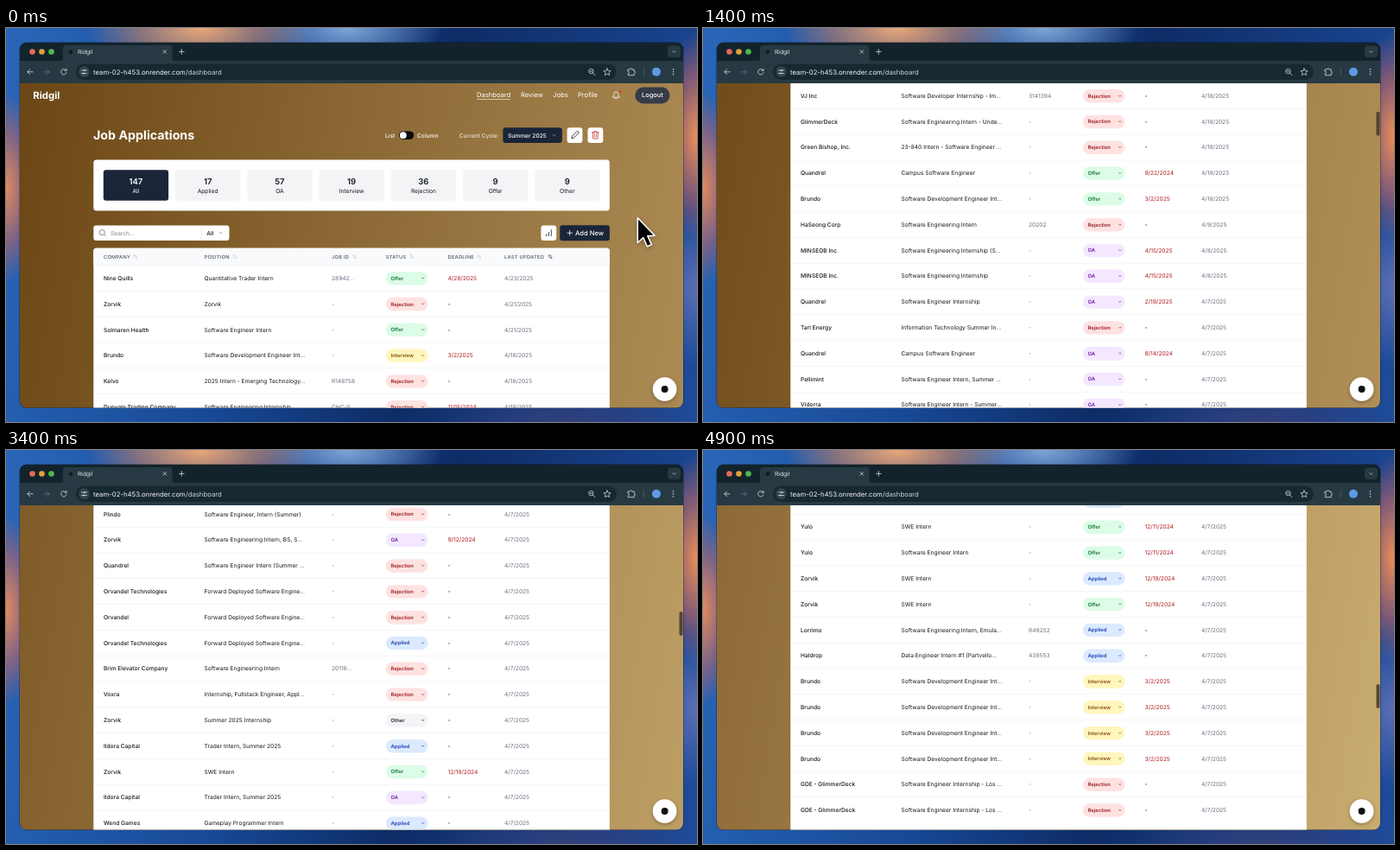
Animation of 800x456 px, one loop 5000 ms. Source, as an HTML page:

```html
<!DOCTYPE html>
<html lang="en">
<head>
<title>Job applications dashboard</title>
<style>
html, body { margin: 0; width: 100%; height: 100%; overflow: hidden; }
body {
  background:
    radial-gradient(ellipse 130px 60px at 225px 0, #e9a878, #e08a5a88 55%, transparent),
    radial-gradient(ellipse 110px 50px at 395px 0, #7fa6d8, transparent),
    radial-gradient(ellipse 40px 110px at 0 185px, #e58a5c, #c4646088 60%, transparent),
    radial-gradient(ellipse 45px 120px at 800px 125px, #ee8f55, #d0686088 60%, transparent),
    radial-gradient(ellipse 60px 90px at 800px 300px, #5a6fb4, transparent),
    radial-gradient(ellipse 160px 40px at 650px 456px, #32407c, transparent),
    linear-gradient(100deg, #2a66b8, #174a98 35%, #0e2c66 60%, #1d4c9c);
}
svg { display: block; width: 800px; height: 456px; text-rendering: geometricPrecision;
  font-family: Inter, "Open Sans", sans-serif; }
</style>
</head>
<body>
<svg id="stage" viewBox="0 0 800 456"></svg>
<script>
const PITCH = 29.8, FIRST = 289.5, PAGE = 4620, TOTAL = 147;
const NAVY = '#1a2638', INK = '#14181f', GREY = '#6b7280';

// company | position | status | job id | deadline | updated
const parse = s => s.trim().split('\n').map(l => l.split('|'));
const early = parse(`
Nine Quills|Quantitative Trader Intern|F|28942...|4/28/2025|4/23/2025
Zorvik|Zorvik|R|||4/21/2025
Solmaren Health|Software Engineer Intern|F|||4/21/2025
Brundo|Software Development Engineer Int...|I||3/2/2025|4/18/2025
Kelvo|2025 Intern - Emerging Technology...|R|R148758||4/18/2025
Dunvale Trading Company|Software Engineering Internship|R|CHC-5...|11/15/2024|4/18/2025
VJ Inc|Software Developer Internship - Im...|R|3141394||4/18/2025
GlimmerDeck|Software Engineering Intern - Unde...|R|||4/18/2025
Green Bishop, Inc.|23-840 Intern - Software Engineer ...|R|||4/18/2025
Quandrel|Campus Software Engineer|F||9/22/2024|4/18/2025
Brundo|Software Development Engineer Int...|F||3/2/2025|4/18/2025
HaSeong Corp|Software Engineering Intern|R|20202||4/9/2025
MINSEOB Inc.|Software Engineering Internship (S...|A||4/15/2025|4/8/2025
MINSEOB Inc.|Software Engineering Internship|A||4/15/2025|4/8/2025
Quandrel|Software Engineer Internship|A||2/19/2025
Tarl Energy|Information Technology Summer In...|R
Quandrel|Campus Software Engineer|A||8/14/2024
Pellimint|Software Engineer Intern, Summer ...|A
Vidorra|Software Engineer Intern - Summer...|A
Pellimint|Data Scientist Intern, Summer 2025|R
XJN|Back End Developer Intern|A|72275...
Hob Larks|Developer Support Intern|R
Pellimint|Software Engineer Intern, Summer ...|R
Plindo|Software Engineer, Intern (Summer)|R
Zorvik|Software Engineering Intern, BS, S...|A||9/12/2024
Quandrel|Software Engineer Intern (Summer ...|R
Orvandel Technologies|Forward Deployed Software Engine...|R
Orvandel|Forward Deployed Software Engine...|R
Orvandel Technologies|Forward Deployed Software Engine...|P
Brim Elevator Company|Software Engineering Intern|R|20116...
Voxra|Internship, Fullstack Engineer, Appl...|R
Zorvik|Summer 2025 Internship|X
Ildora Capital|Trader Intern, Summer 2025|P
Zorvik|SWE Intern|F||12/19/2024
Ildora Capital|Trader Intern, Summer 2025|A
Wend Games|Gameplay Programmer Intern|P
XJN|Software Developer Intern|R|2025 7...
Wend Games|Gameplay Programmer Intern|A||9/6/2024
Ildora Capital|Trader Intern, Summer 2025|A||10/11/2024
Slok|Software Engineer Internship &#124; Bac...|P||2/11/2025
DrelAI|Internship|R
Kelvo|2025 Intern - Engineer/Architect|R|R148759
`);
const middle = parse(`
XJN|Software Developer Intern|R|74272...
Molvera|Summer 2025 Software Engineer In...|P
Tasklorn|Software Application Development ...|R|JR-00...
ZELDRA|Software Engineering Intern, RuVo...|I
B Tonnel|2025 Summer Internship|X||11/12/2024
B Tonnel|Summer Internship|X||11/12/2024
B Tonnel|2025 Summer Internship|X
B Tonnel|2025 Summer Internship|X||11/12/2024
ZELDRA|Software Engineering Intern, RuVo...|I
ZELDRA|Software Engineering Intern, RuVo...|I
Quandrel|Software Engineer Intern|A||3/31/2025
SpotOy|Game Developer internship|I||1/27/2025
Skelmor, Inc.|Software Engineering Internship or ...|A|31967...|3/18/2025
`);
const brundo = ['Brundo', 'Software Development Engineer Int...', 'I', '', '3/2/2025'];
const deck = ['GDE - GlimmerDeck', 'Software Engineer Internship - Los ...', 'R'];
const late = [...parse(`
Yulo|SWE Intern|F||12/11/2024
Yulo|Software Engineer Intern|F||12/11/2024
Zorvik|SWE Intern|P||12/19/2024
Zorvik|SWE Intern|F||12/19/2024
Lorrimo|Software Engineering Intern, Emula...|P|R49252
Haldrop|Data Engineer Intern #1 (Partvello...|P|438553
`), brundo, brundo, brundo, brundo, deck, deck];
const rows = [...early, ...early.slice(22, 41), ...middle, ...early.slice(32, 36), ...late];

const status = {
  F: ['Offer', '#dcfce7', '#15753a'], R: ['Rejection', '#fee2e2', '#991b1b'],
  I: ['Interview', '#fef6bd', '#854d0e'], A: ['OA', '#f3e8ff', '#6b21a8'],
  P: ['Applied', '#dbeafe', '#1e40af'], X: ['Other', '#f3f4f6', '#1f2937']
};

const text = (x, y, s, fill = INK, size = 6.65, weight = 400, more = '') =>
  `<text x="${x}" y="${y}" fill="${fill}" font-size="${size}" font-weight="${weight}" ${more}>${s}</text>`;
const rect = (x, y, w, h, fill, r = 0, more = '') =>
  `<rect x="${x}" y="${y}" width="${w}" height="${h}" rx="${r}" fill="${fill}" ${more}/>`;
const line = (d, color, w = 0.8) =>
  `<path d="${d}" fill="none" stroke="${color}" stroke-width="${w}" stroke-linecap="round" stroke-linejoin="round"/>`;
const dot = (x, y, r, fill, more = '') => `<circle cx="${x}" cy="${y}" r="${r}" fill="${fill}" ${more}/>`;
const chevron = (x, y, color, r = 1.5) => line(`M${x - r} ${y - r / 2}l${r} ${r}l${r} ${-r}`, color, 0.7);
const mid = 'text-anchor="middle"';

function nav() {
  const links = [['Dashboard', 545], ['Review', 596], ['Jobs', 633.3], ['Profile', 662]];
  return text(31.3, 82, 'Ridgil', '#fff', 11.4, 700) +
    links.map(([s, x]) => text(x, 80.4, s, '#fff', 7.6)).join('') +
    rect(545, 82.3, 39, 0.6, '#fff') +
    line('M702.6 80c1.2-1.2 1.2-2 1.2-3.6a2.5 2.5 0 0 1 5 0c0 1.6 0 2.4 1.2 3.6zM705.3 81.7q1 1 2 0', '#fff') +
    dot(711.6, 73.4, 1.7, '#d9483b') +
    rect(728.3, 68.4, 40.2, 19, '#353c47', 9.5) + text(748.4, 80.4, 'Logout', '#fff', 7.4, 500, mid);
}

function controls() {
  return text(101, 129.2, 'Job Applications', '#fff', 14.25, 700) +
    text(439, 126.7, 'List', '#fff', 6.65, 500) + rect(455, 119.4, 17.2, 9.6, '#0a0a0a', 4.8) +
    dot(459.8, 124.2, 3.9, '#fff') + text(476, 126.7, 'Column', '#fff', 6.65, 500) +
    text(524.7, 126.7, 'Current Cycle:', '#ece4d6', 6.65, 500) +
    rect(575.3, 115.3, 68.5, 17.6, NAVY, 3) + text(581, 126.6, 'Summer 2025', '#fff', 6.65, 500) +
    chevron(634.5, 124.2, '#aeb5c0') +
    rect(649.6, 115.3, 17.8, 17.6, '#fff', 3) +
    line('M655 127.6l.6-2.6 5.2-5.2q1-.7 1.9.2t.2 1.8l-5.3 5.2z', INK) +
    rect(673.5, 115.3, 17.8, 17.6, '#fff', 3) +
    line('M678.4 121h8M680.7 121v-1.3h3.4v1.3M679.3 121l.4 7.2h5.4l.4-7.2M681.4 123v3.4M683.4 123v3.4', '#c62f2f', 0.75);
}

function stats() {
  const items = [[147, 'All'], [17, 'Applied'], [57, 'OA'], [19, 'Interview'], [36, 'Rejection'], [9, 'Offer'], [9, 'Other']];
  return rect(101.3, 152.5, 597.5, 59, '#fff', 3.5) + items.map(([n, s], i) => {
    const x = 112.8 + i * 83.25, ink = i ? INK : '#fff';
    return rect(x, 164.2, 75.3, 35.6, i ? '#f3f4f6' : NAVY, 3) +
      text(x + 37.6, 180.7, n, ink, 9.5, 600, mid) + text(x + 37.6, 191.2, s, ink, 6.65, 400, mid);
  }).join('');
}

function tools() {
  return rect(101.3, 228.4, 157.2, 17.6, '#fff', 3) + rect(226, 228.4, 0.6, 17.6, '#dfe1e5') +
    dot(111.3, 236.6, 3.1, 'none', 'stroke="#6b7280" stroke-width=".8"') + line('M113.6 239l2 2', GREY) +
    text(121, 239.6, 'Search...', '#7b818c') + text(232.3, 239.6, 'All', INK, 6.65, 500) + chevron(248.7, 237.2, GREY) +
    rect(619.4, 228.4, 17.8, 17.6, '#fff', 3) + line('M625.5 240.5v-1.6M628.4 240.5v-4M631.3 240.5v-6.8', INK) +
    rect(641.2, 228.2, 57.7, 18, NAVY, 3) + line('M650 237.2h5.4M652.7 234.5v5.4', '#fff') +
    text(659, 239.9, 'Add New', '#fff', 7.6, 500);
}

function table() {
  const heads = [['COMPANY', 113, 148], ['POSITION', 229.5, 263], ['JOB ID', 377, 401.5],
    ['STATUS', 439.8, 467.5], ['DEADLINE', 511.5, 546], ['LAST UPDATED', 577, 628]];
  let out = rect(101.3, 254.7, 597.5, 19.9 + TOTAL * PITCH, '#fff', 3.5) +
    `<path d="M101.3 274.6v-16.4q0-3.5 3.5-3.5h590.5q3.5 0 3.5 3.5v16.4z" fill="#f9fafb"/>`;
  for (const [s, x, a] of heads)
    out += text(x, 266.9, s, '#4b5563', 5.7, 500, 'letter-spacing=".285"') +
      line(`M${a} 263.8l1-1.2 1 1.2M${a + 1} 262.6v3.6M${a + 2.2} 265.6l1 1.2 1-1.2M${a + 3.2} 266.8v-3.6`,
        s[0] == 'L' ? '#374151' : '#c3c7cd', 0.55);
  rows.forEach(([company, position, key, id, due, updated], i) => {
    const y = FIRST + i * PITCH, base = y + 2.4, [label, bg, ink] = status[key];
    out += rect(101.3, y - PITCH / 2 - 0.25, 597.5, 0.5, '#e8eaed') +
      text(113, base, company, INK, 6.65, 500) + text(229.5, base, position) +
      text(377, base, id || '-', GREY) +
      rect(439.8, y - 7.5, 48.6, 15.4, bg, 7.7) + text(445.6, y + 2.2, label, ink, 5.85, 600) +
      chevron(482.7, y + 0.1, ink, 1.2) +
      text(511.5, base, due || '-', due ? '#b01c22' : INK, 6.65, due ? 400 : 500) +
      text(577, base, updated || '4/7/2025', GREY);
  });
  return out;
}

function browser() {
  const pale = '#d5dde1';
  return rect(16, 17, 768, 21.5, '#13232b') +
    ['#e8695c', '#e0a13c', '#4fb84e'].map((c, i) => dot(30.5 + i * 11, 27.5, 3.3, c)).join('') +
    '<path d="M62 38.5q4 0 4-4v-10.5q0-4 4-4h118.5q4 0 4 4v10.5q0 4 4 4z" fill="#273a43"/>' +
    dot(75, 27.5, 2.2, '#10191e') + text(83, 29.8, 'Ridgil', '#e4eaec', 6.7) +
    line('M182 25.6l3.6 3.6m0-3.6l-3.6 3.6M200.5 27.4h5.6M203.3 24.6v5.6', pale) +
    rect(766, 20.5, 15, 13.5, '#273a43', 4) + chevron(773.5, 27.5, pale) +
    rect(16, 38, 768, 26, '#273a43') + rect(81, 41.5, 626, 18.5, '#182830', 9.25) +
    line('M31 50.8h-6.2m2.8-2.8l-2.8 2.8 2.8 2.8', pale) +
    line('M44 50.8h6.2m-2.8-2.8l2.8 2.8-2.8 2.8', '#66767e') +
    line('M69.6 49a3.2 3.2 0 1 0 .4 2.6M70 47.3v2h-2', pale) +
    dot(90.5, 50.7, 6.4, '#30444d') +
    line('M87.5 49h2.5M92 49h1.5M87.5 52.5h1.5M91 52.5h2.5', pale) +
    dot(91, 49, 1, pale) + dot(90, 52.5, 1, pale) +
    text(101, 53.5, 'team-02-h453.onrender.com<tspan fill="#cbd3d7">/dashboard</tspan>', '#f0f3f4', 7.75) +
    dot(677.4, 50, 2.7, 'none', `stroke="${pale}" stroke-width=".8"`) +
    line('M679.4 52l2.6 2.6M676.2 50h2.4', pale) +
    line('M696 46.8l1.2 2.7 2.9.3-2.2 1.9.7 2.9-2.6-1.5-2.6 1.5.7-2.9-2.2-1.9 2.9-.3z', pale, 0.75) +
    line('M720.3 48h2.2a1.2 1.2 0 0 1 2.4 0h2.3v2.2a1.2 1.2 0 0 1 0 2.4v2.1h-6.9v-2a1.2 1.2 0 0 0 0-2.5z', pale) +
    rect(737.8, 46, 0.7, 9.5, '#53656e') + dot(753, 50.7, 5, '#5d9ae6') +
    [-3, 0, 3].map(d => dot(772.5, 50.7 + d, 0.8, pale)).join('');
}

// Corner-to-corner page gradient
const tilt = 768 / PAGE, reach = 1536 / (1 + tilt * tilt);

const stage = document.getElementById('stage');
stage.innerHTML = `
<defs>
  <linearGradient id="page" gradientUnits="userSpaceOnUse" x1="16" y1="64" x2="${16 + reach}" y2="${64 + reach * tilt}">
    <stop offset="0" stop-color="#6c4715"/><stop offset=".5" stop-color="#a78650"/><stop offset="1" stop-color="#dcc283"/>
  </linearGradient>
  <clipPath id="frame">${rect(16, 17, 768, 422.5, '#000', 8)}</clipPath>
  <clipPath id="view">${rect(16, 64, 768, 376, '#000')}</clipPath>
  <filter id="soft" x="-50%" y="-50%" width="200%" height="200%">
    <feDropShadow dx="0" dy="1.5" stdDeviation="2" flood-opacity=".3"/>
  </filter>
</defs>
${rect(15.5, 16.5, 769, 423.5, '#0008', 8.5)}
<g clip-path="url(#frame)">
  <g clip-path="url(#view)">
    <g id="content">${rect(16, 64, 768, PAGE, 'url(#page)')}${nav()}${controls()}${stats()}${tools()}${table()}</g>
    ${rect(779.5, 65, 4, 28, '#41372a', 2, 'id="thumb" opacity=".85"')}
    ${dot(762.6, 418, 13.8, '#fff', 'filter="url(#soft)"')}${dot(762.6, 418, 4, '#111')}
  </g>
  ${browser()}
</g>
<path id="cursor" d="M731.3 219.8v28.7l6.5-6 4.6 10.3 5-2.2-4.6-9.8 8.2-.6z" stroke="#fff"
  stroke-width="1.5" stroke-linejoin="round" filter="url(#soft)"/>`;

// Scroll position through time, as a monotone cubic
const knots = [[0, 0], [600, 105.5], [1400, 389.8], [2000, 740.4], [2800, 1073.7], [4100, 2043.8], [4900, 2524.9]];
const slopes = knots.slice(1).map(([t, y], i) => (y - knots[i][1]) / (t - knots[i][0]));
const tangent = i => i == 0 ? 0 : i == slopes.length ? slopes[i - 1]
  : 2 * slopes[i - 1] * slopes[i] / (slopes[i - 1] + slopes[i]);

function scrollAt(t) {
  const i = Math.max(0, knots.findIndex(k => t <= k[0]) - 1);
  const [t0, y0] = knots[i], [t1, y1] = knots[i + 1], h = t1 - t0, u = (t - t0) / h, v = 1 - u;
  return v * v * ((1 + 2 * u) * y0 + u * h * tangent(i)) + u * u * ((1 + 2 * v) * y1 - v * h * tangent(i + 1));
}

const [content, thumb, cursor] = ['content', 'thumb', 'cursor'].map(id => document.getElementById(id));
const start = performance.now();
function draw() {
  const t = Math.floor((performance.now() - start) % 5000 / 100) * 100, y = scrollAt(t);
  content.setAttribute('transform', `translate(0 ${-y})`);
  thumb.setAttribute('y', 65 + y * 0.0816);
  thumb.style.display = t ? '' : 'none';
  cursor.style.display = t < 1000 ? '' : 'none';
  requestAnimationFrame(draw);
}
draw();
</script>
</body>
</html>
```
